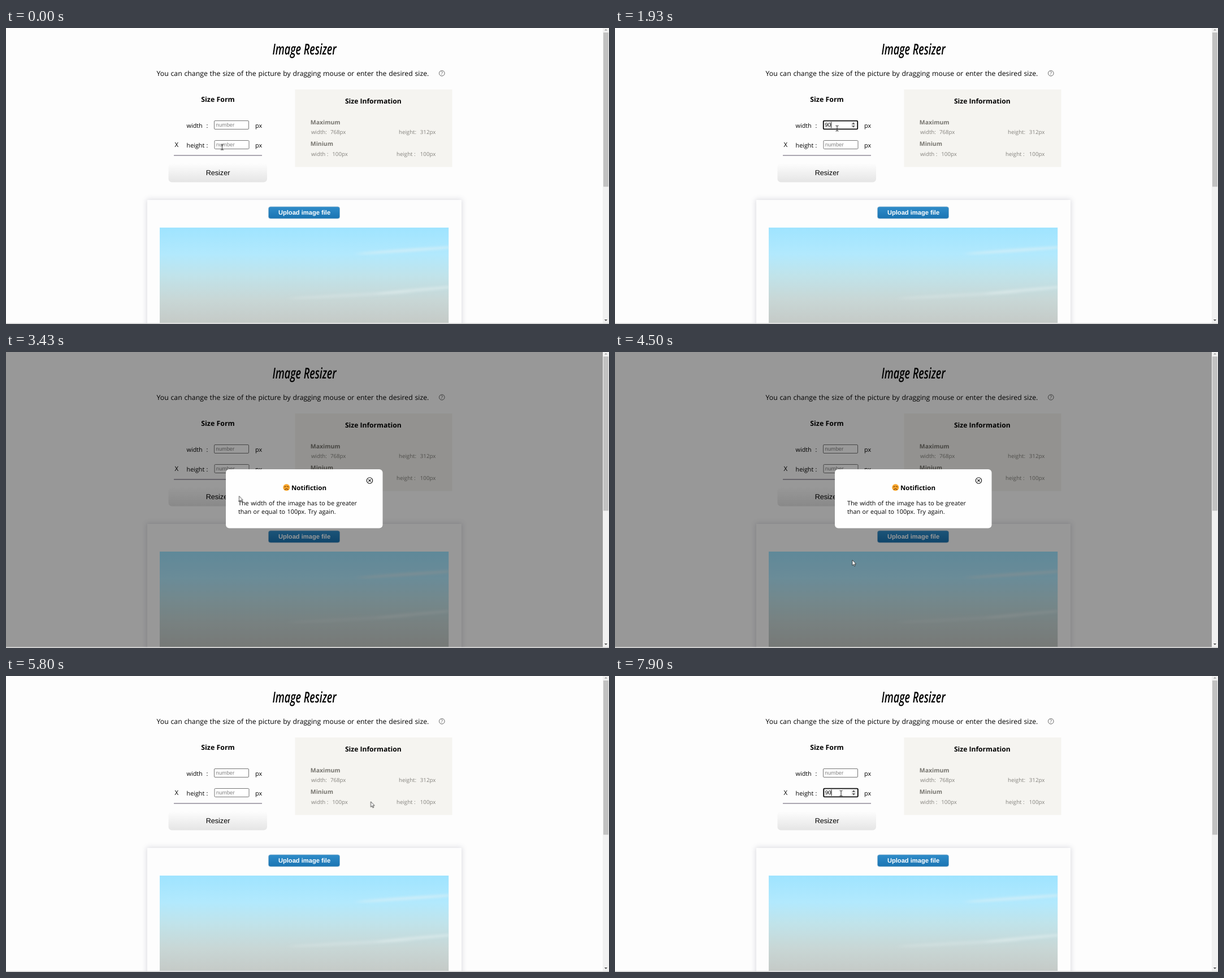
Recreate the animation shown at these times as an HTML page. Size 1067 by 525 pixels, loop 8000 ms.

```html
<!DOCTYPE html>
<html lang="en">
<head>
<meta charset="utf-8">
<title>Image Resizer</title>
<style>
html, body { margin: 0; width: 100%; height: 100%; overflow: hidden; background: #fdfdfd; }
svg { display: block; width: 100%; height: 100%; }
text { font-family: "Open Sans", "Noto Sans", sans-serif; text-rendering: geometricPrecision; fill: #000; white-space: pre; }
.arial { font-family: "Liberation Sans", Arial, sans-serif; }
.b { font-weight: 700; }
.mid { text-anchor: middle; }
.title { font-size: 18px; font-weight: 600; font-style: italic; transform: translate(528px, 47px) scaleY(1.48); }
.lead { font-size: 12.25px; word-spacing: .65px; }
.label { font-size: 10.8px; }
.head { font-size: 10.45px; font-weight: 700; fill: #77756f; }
.info { font-size: 9.7px; fill: #85837e; }
.note { font-size: 10.8px; word-spacing: .75px; }
.field { font-size: 9.7px; }
.ph { fill: #858585; }

/* 8 s timeline: 1% = 80 ms */
.t { animation: 8s step-end infinite; }
.ph1 { animation-name: ph1; }
.ph2 { animation-name: ph2; }
.focus1 { animation-name: focus1; }
.focus2 { animation-name: focus2; }
.w9 { animation-name: w9; }
.w0 { animation-name: w0; }
.h9 { animation-name: h9; }
.h0 { animation-name: h0; }
.caret1 { animation-name: caret1; }
.caret2 { animation-name: caret2; }
.hover { animation-name: hand; }
.modal { animation-name: modal; }
.closeOn { animation-name: closeOn; }
.ibeam { animation-name: ibeam; }
.arrow { animation-name: arrow; }
.hand { animation-name: hand; }
.pointer { animation: move 8s ease-in-out infinite; }

@keyframes ph1 { 0%, 42.875%, 100% { visibility: visible } 22.125% { visibility: hidden } }
@keyframes ph2 { 0% { visibility: visible } 96.625%, 100% { visibility: hidden } }
@keyframes focus1 { 0%, 40.875%, 100% { visibility: hidden } 7.5% { visibility: visible } }
@keyframes focus2 { 0% { visibility: hidden } 83.75%, 100% { visibility: visible } }
@keyframes w9 { 0%, 42.875%, 100% { visibility: hidden } 22.125% { visibility: visible } }
@keyframes w0 { 0%, 42.875%, 100% { visibility: hidden } 23.75% { visibility: visible } }
@keyframes h9 { 0% { visibility: hidden } 96.625%, 100% { visibility: visible } }
@keyframes h0 { 0% { visibility: hidden } 98.375%, 100% { visibility: visible } }
@keyframes caret1 {
  0%, 13.75%, 30.375%, 40.875%, 100% { visibility: hidden }
  7.5%, 20.375%, 36.625% { visibility: visible }
  0%, 7.5% { transform: none }
  22.125% { transform: translateX(5.4px) }
  23.75%, 100% { transform: translateX(10.8px) }
}
@keyframes caret2 {
  0%, 90.375% { visibility: hidden }
  83.75%, 96.625%, 100% { visibility: visible }
  0% { transform: none }
  96.625% { transform: translateX(5.4px) }
  98.375%, 100% { transform: translateX(10.8px) }
}
@keyframes modal { 0%, 72.5%, 100% { visibility: hidden } 42.875% { visibility: visible } }
@keyframes closeOn { 0%, 72.5%, 100% { visibility: hidden } 68.3% { visibility: visible } }
@keyframes ibeam { 0%, 5.6%, 80.2%, 100% { visibility: visible } 2.94%, 33.9% { visibility: hidden } }
@keyframes hand { 0%, 42.875%, 100% { visibility: hidden } 36.2% { visibility: visible } }
@keyframes arrow { 0%, 5.6%, 36.2%, 80.2%, 100% { visibility: hidden } 2.94%, 33.9%, 42.875% { visibility: visible } }
@keyframes move {
  0%, .375% { transform: translate(382.5px, 211.5px) }
  6.5%, 33.375% { transform: translate(393px, 178px) }
  37.5%, 51.25% { transform: translate(412.5px, 255.5px) }
  56.625%, 60.875% { transform: translate(420px, 370px) }
  69.125%, 72.75% { transform: translate(645.5px, 222.8px) }
  82.5%, 100% { transform: translate(400px, 208px) }
}
</style>
</head>
<body>
<svg viewBox="0 0 1067 525" preserveAspectRatio="none">
  <defs>
    <linearGradient id="btn" x2="0" y2="1"><stop stop-color="#fdfdfd"/><stop offset="1" stop-color="#e5e5e5"/></linearGradient>
    <linearGradient id="btnHover" x2="0" y2="1"><stop stop-color="#e4e4e7"/><stop offset="1" stop-color="#f6f6f6"/></linearGradient>
    <linearGradient id="blue" x2="0" y2="1"><stop stop-color="#2f8cc9"/><stop offset="1" stop-color="#1a74b2"/></linearGradient>
    <linearGradient id="sky" x2="0" y2="1">
      <stop stop-color="#9fe4ff"/><stop offset=".28" stop-color="#b2e9fd"/>
      <stop offset=".5" stop-color="#c0e3ea"/><stop offset=".75" stop-color="#c8d7d6"/><stop offset="1" stop-color="#c5cac7"/>
    </linearGradient>
    <filter id="soft" x="-20%" y="-200%" width="140%" height="500%"><feGaussianBlur stdDeviation="6 2"/></filter>
    <filter id="shadow" x="-5%" y="-10%" width="110%" height="120%"><feGaussianBlur stdDeviation="5"/></filter>
    <clipPath id="photo"><path d="M272 354h511.500v169h-511.500z"/></clipPath>
    <rect id="box" x="368.500" y="164.500" width="61" height="15" rx="1.500" fill="#fff" stroke="#767676"/>
    <g id="ring">
      <rect x="368.800" y="164.600" width="60.400" height="14.800" rx="1.500" fill="#fff" stroke="#101010" stroke-width="1.900"/>
      <rect x="417" y="166.500" width="9.500" height="11" fill="#efefef"/>
      <path d="M419 170.800l2.800-3.300 2.800 3.300zM419 173.200l2.800 3.300 2.800-3.300z" fill="#505050"/>
    </g>
    <path id="caret" d="M371.700 166.500v11" stroke="#000"/>
  </defs>

  <rect width="1067" height="525" fill="#fdfdfd"/>
  <text class="title mid">Image Resizer</text>
  <text class="lead" x="266.500" y="85">You can change the size of the picture by dragging mouse or enter the desired size.</text>
  <circle cx="771.300" cy="80.300" r="4.800" fill="none" stroke="#555" stroke-width=".9"/>
  <text class="mid" x="771.300" y="83.200" font-size="8" style="fill:#444">?</text>

  <text class="b mid" x="375" y="131" font-size="12.400">Size Form</text>
  <g class="label">
    <text x="319.500" y="177">width</text><text x="354.500" y="177">:</text><text x="441" y="177">px</text>
    <text x="298.500" y="211.300" font-size="11.500">X</text>
    <text x="319.500" y="212">height</text><text x="354.500" y="212">:</text><text x="441" y="212">px</text>
  </g>
  <path d="M297 226h156" stroke="#5a5266" stroke-width="1.200"/>

  <g class="field">
    <use href="#box"/>
    <use href="#ring" class="t focus1"/>
    <text class="arial ph t ph1" x="371.300" y="175">number</text>
    <text class="arial" x="371.200" y="175"><tspan class="t w9">9</tspan><tspan class="t w0">0</tspan></text>
    <use href="#caret" class="t caret1"/>
  </g>
  <g class="field" transform="translate(.5 35)">
    <use href="#box"/>
    <use href="#ring" class="t focus2"/>
    <text class="arial ph t ph2" x="371.300" y="175">number</text>
    <text class="arial" x="371.200" y="175"><tspan class="t h9">9</tspan><tspan class="t h0">0</tspan></text>
    <use href="#caret" class="t caret2"/>
  </g>

  <rect x="287.500" y="240" width="174.500" height="33.500" rx="6" fill="url(#btn)"/>
  <rect class="t hover" x="287" y="240" width="175.500" height="34.500" rx="6" fill="url(#btnHover)" stroke="#dedee2"/>
  <text class="arial mid" x="375" y="260.800" font-size="12.600">Resizer</text>

  <rect x="511.500" y="109" width="278" height="137.500" fill="#f5f4f0"/>
  <text class="b mid" x="649.800" y="133.500" font-size="12.100">Size Information</text>
  <text class="head" x="538.800" y="170.800">Maximum</text>
  <text class="head" x="538.800" y="209.200">Minium</text>
  <g class="info">
    <text class="info" x="540" y="187.700">width:</text><text class="info" x="574" y="187.700">768px</text>
    <text class="info" x="695" y="187.700">height:</text><text class="info" x="732.800" y="187.700">312px</text>
    <text class="info" x="540" y="226.900">width :</text><text class="info" x="577.300" y="226.900">100px</text>
    <text class="info" x="691" y="226.900">height :</text><text class="info" x="732.800" y="226.900">100px</text>
  </g>

  <rect x="249" y="304" width="558" height="240" fill="#64647d" opacity=".22" filter="url(#shadow)"/>
  <rect x="250" y="305" width="556" height="220" fill="#fdfdfd"/>
  <rect x="464.500" y="317" width="126" height="21" rx="3.500" fill="url(#blue)" stroke="#8fb4cf" stroke-width=".8"/>
  <text class="arial b mid" x="528" y="331" font-size="11.150" style="fill:#fff">Upload image file</text>
  <g clip-path="url(#photo)">
    <rect x="272" y="354" width="511.500" height="170" fill="url(#sky)"/>
    <g fill="#e9f3f4" filter="url(#soft)">
      <ellipse cx="715" cy="394" rx="95" ry="2.500" opacity=".55" transform="rotate(-4 715 394)"/>
      <ellipse cx="735" cy="464" rx="80" ry="2.500" opacity=".5" transform="rotate(-5 735 464)"/>
      <ellipse cx="610" cy="474" rx="110" ry="3" opacity=".25" transform="rotate(-3 610 474)"/>
    </g>
  </g>

  <g class="t modal">
    <rect width="1056" height="523.500" opacity=".4"/>
    <rect x="389" y="208" width="277.500" height="104.500" rx="6" fill="#fefefe"/>
    <circle cx="496.300" cy="240.300" r="6" fill="#f8a62c"/>
    <path d="M492.800 239.200l2.300-.8M499.800 239.200l-2.300-.8M493.300 244.200q3-3 6 0" fill="none" stroke="#6b3a10" stroke-width="1.100" stroke-linecap="round"/>
    <text class="b" x="505" y="244.800" font-size="11.500">Notifiction</text>
    <text class="note" x="411" y="271.500">The width of the image has to be greater</text>
    <text class="note" x="411" y="286.500">than or equal to 100px. Try again.</text>
    <g fill="none" stroke="#111" stroke-width="1.100">
      <circle cx="643.500" cy="228" r="5.200"/>
      <path d="M641.300 225.800l4.400 4.400m0-4.400l-4.400 4.400"/>
    </g>
    <g class="t closeOn" fill="none" stroke="#e8f3fa">
      <circle cx="643.500" cy="228" r="6.800" fill="#1f7fbe" stroke="none"/>
      <circle cx="643.500" cy="228" r="4.800" stroke-width=".8"/>
      <path d="M641.500 226l4 4m0-4l-4 4"/>
    </g>
  </g>

  <rect x="1056" width="11" height="525" fill="#f1f1f1"/>
  <rect x="1057" y="8" width="9" height="273.500" fill="#c1c1c1"/>
  <path d="M1058.800 4.500l2.700-2.800 2.700 2.800z" fill="#a3a3a3"/>
  <path d="M1058.800 517l2.700 2.800 2.700-2.800z" fill="#505050"/>
  <rect y="523.500" width="1067" height="1.500" fill="#cfcfcf"/>

  <g class="pointer">
    <path class="t ibeam" d="M-2.500-4.800q2 0 2.500.8q.5-.8 2.500-.8M0-4v8M-2.500 4.800q2 0 2.500-.8q.5.800 2.500.8" fill="none" stroke="#222"/>
    <path class="t arrow" d="M0 0v9.600l2.200-2 1.500 3.300 1.500-.7-1.500-3.200h2.900z" fill="#fff" stroke="#222" stroke-width=".8"/>
    <path class="t hand" d="M-.9.800q.9-1.200 1.800 0v4.300q1-.8 1.800.2q1-.6 1.700.4q1.200-.5 1.600.7v2.800q-.2 1.700-1.200 3.300h-4.500q-1.400-2.200-3.200-4q-.9-1.800.7-1.700l1.300 1z" fill="#fff" stroke="#222" stroke-width=".9" stroke-linejoin="round"/>
  </g>
</svg>
</body>
</html>
```
